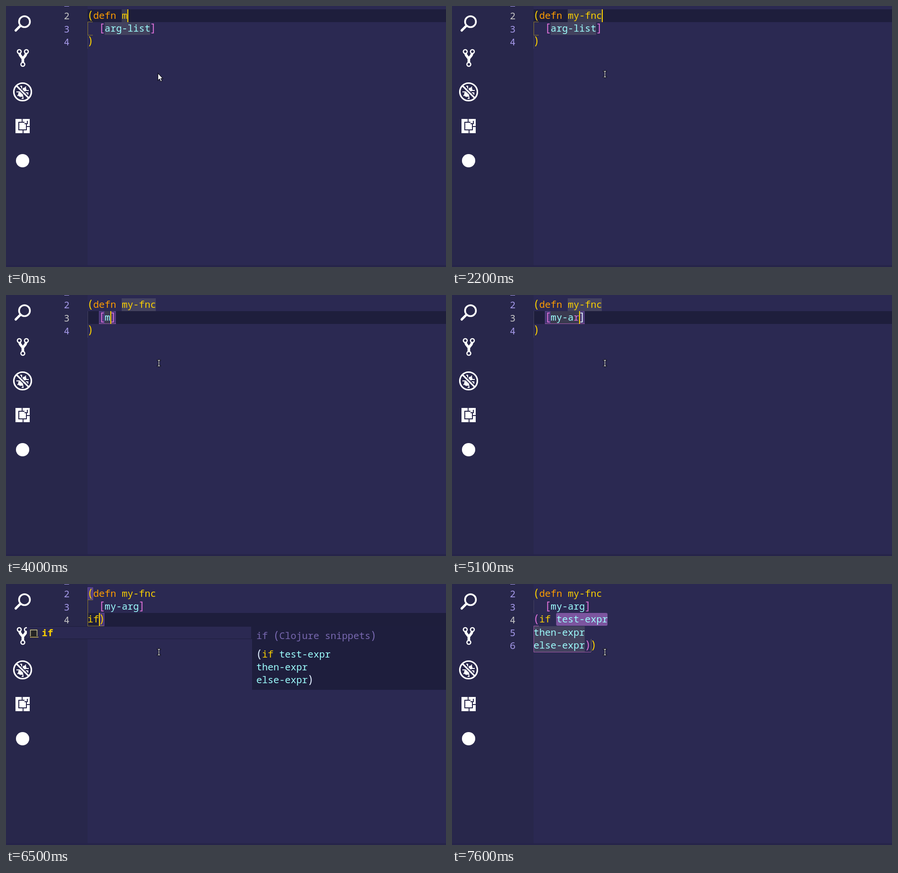
An HTML page with a canvas that plays this animation: 928 px wide and 550 px high, repeating every 8000 ms.

```html
<!DOCTYPE html>
<html lang="en">
<head>
<meta charset="utf-8">
<title>Editor snippets</title>
<style>
html, body { margin: 0; width: 100%; height: 100%; overflow: hidden; background: #2b2952; }
canvas { display: block; }
</style>
</head>
<body>
<canvas id="stage" width="928" height="550"></canvas>
<script>
const ctx = document.getElementById('stage').getContext('2d');
const LOOP = 8000;
const FAMILY = '"Noto Sans Mono", "DejaVu Sans Mono", monospace';
const FONT = '20.07px ' + FAMILY;
const BRACKET_FONT = '23px ' + FAMILY;
const LEFT = 172, ADV = 12.04, TOP = 7, PITCH = 27.2;
const C = {
  bg: '#2b2952', gutter: '#28274b', dark: '#1e1e3d', line: '#1e1e3c',
  gold: '#fad000', orange: '#ff9d00', cyan: '#9effff', pink: '#da70d6',
  white: '#e1efff', num: '#a599e9', numOn: '#c6c6c6', hint: '#7868b0',
  stop: 'rgba(124,124,124,.3)', select: '#7c559f', match: 'rgba(173,112,252,.275)',
  goldLine: '#917c2c', pinkLine: '#a45aa8', guide: '#454361'
};

const colX = col => LEFT + ADV * col;
const rowY = row => Math.round(TOP + PITCH * row);

function rect(x, y, w, h, color) {
  ctx.fillStyle = color;
  ctx.fillRect(x, y, w, h);
}

function text(str, x, y, color, font = FONT) {
  ctx.font = font;
  ctx.fillStyle = color;
  ctx.fillText(str, x, y);
}

// brackets are larger than the letters and centred in their cell
function bracket(ch, x, y, color) {
  ctx.textAlign = 'center';
  text(ch, x + ADV / 2, y, color, BRACKET_FONT);
  ctx.textAlign = 'left';
}

// parts alternate string, color
function spans(x, y, ...parts) {
  for (let i = 0; i < parts.length; i += 2) {
    for (const piece of parts[i].split(/([()[\]])/)) {
      if (/^[()[\]]$/.test(piece)) bracket(piece, x, y, parts[i + 1]);
      else text(piece, x, y, parts[i + 1]);
      x += ADV * piece.length;
    }
  }
}

const code = (row, ...parts) => spans(LEFT, rowY(row) + 20, ...parts);

function cells(row, col, count, color) {
  const x = Math.round(colX(col));
  rect(x, rowY(row), Math.round(colX(col + count)) - x, rowY(row + 1) - rowY(row), color);
}

function selection(row, col, count) {
  ctx.fillStyle = C.select;
  ctx.beginPath();
  ctx.roundRect(colX(col) - .5, rowY(row), ADV * count, 27, 3);
  ctx.fill();
}

function bracketBox(row, col) {
  const x = Math.round(colX(col));
  cells(row, col, 1, C.match);
  ctx.strokeStyle = C.match;
  ctx.lineWidth = 1;
  ctx.strokeRect(x + .5, rowY(row) + .5, 10, 26);
}

const caret = (row, col) => rect(Math.floor(colX(col)), rowY(row), 2, 27, C.gold);

function stroke(width, color, ...lines) {
  ctx.lineWidth = width;
  ctx.strokeStyle = color;
  ctx.beginPath();
  for (const pts of lines) {
    ctx.moveTo(pts[0], pts[1]);
    for (let i = 2; i < pts.length; i += 2) ctx.lineTo(pts[i], pts[i + 1]);
  }
  ctx.stroke();
}

function ring(x, y, r, width) {
  ctx.lineWidth = width;
  ctx.strokeStyle = '#fff';
  ctx.beginPath();
  ctx.arc(x, y, r, 0, 7);
  ctx.stroke();
}

function disc(x, y, r) {
  ctx.fillStyle = '#fff';
  ctx.beginPath();
  ctx.arc(x, y, r, 0, 7);
  ctx.fill();
}

function icons() {
  // search
  ring(39, 33, 11.5, 3.6);
  ctx.lineCap = 'round';
  stroke(5, '#fff', [30, 42, 20.5, 51.5]);
  ctx.lineCap = 'butt';

  // branches
  for (const [x, y] of [[28, 96], [43, 96], [35.5, 123]]) ring(x, y, 4, 2.6);
  stroke(5.5, '#fff', [28.5, 100, 30, 104, 35.5, 111, 41, 104, 42.5, 100], [35.5, 109, 35.5, 119]);

  // debugging off
  disc(31, 186, 5.5);
  disc(39, 176, 4);
  stroke(2, '#fff', [22, 181, 29, 181, 31, 186], [35, 188, 36, 195, 33, 195],
    [33, 174, 33, 169, 30, 169], [38, 176, 42, 170], [40, 178, 48, 178],
    [39, 183, 46, 183, 46, 187], [24, 189, 30, 187]);
  stroke(7, C.gutter, [21, 167, 49, 195]);
  stroke(3.2, '#fff', [21, 167, 49, 195]);
  ring(35, 181, 18.5, 3.2);

  // extensions
  rect(20, 238, 30, 30, '#fff');
  rect(26, 244, 18, 18, C.gutter);
  rect(28, 246, 14, 14, '#fff');
  rect(33, 238, 2, 7, C.gutter);
  rect(35, 261, 2, 7, C.gutter);
  rect(43, 253, 7, 2, C.gutter);
  rect(39, 242, 7, 7, C.gutter);
  rect(39, 242, 5, 5, '#fff');

  disc(35, 326, 14);
}

function pointer(arrow) {
  if (!arrow) {
    const beam = [[320, 137.5, 325, 137.5], [322.5, 137, 322.5, 150], [320, 149.5, 325, 149.5]];
    ctx.lineCap = 'square';
    stroke(3, '#10101c', ...beam);
    ctx.lineCap = 'butt';
    stroke(1, '#fff', ...beam);
    return;
  }
  const p = new Path2D('M320.5 141.5v15.5l3.5-3.3 2.3 5.5 2.7-1.2-2.3-5.2h4.3z');
  ctx.fillStyle = '#fff';
  ctx.fill(p);
  ctx.lineWidth = 1.2;
  ctx.strokeStyle = '#10101c';
  ctx.stroke(p);
}

function base(active, count, highlight) {
  rect(0, 0, 928, 550, C.bg);
  rect(0, 0, LEFT, 550, C.gutter);
  if (highlight) rect(LEFT, rowY(active), 928 - LEFT, rowY(active + 1) - rowY(active), C.line);
  rect(0, 546, 928, 4, '#26244a');
  rect(123, 0, 10, 1, C.num);
  for (let i = 0; i < count; i++) {
    text(String(i + 2), 122, Math.round(TOP + PITCH * i + 21.3), i === active ? C.numOn : C.num);
  }
  icons();
}

function head(name) {
  code(0, '(', C.gold, 'defn ', C.orange, name, C.gold);
}

function argLine(arg, close = C.pink) {
  code(1, '  [', C.pink, arg, C.cyan, ']', close);
}

function nameScene(t) {
  const keys = [[200, 'my'], [800, 'my-'], [1100, 'my-f'], [1400, 'my-fn'],
    [1700, 'my-fnc'], [2100, 'my-fn'], [2200, 'my-fnc']];
  let name = 'm';
  for (const [at, value] of keys) if (t >= at) name = value;
  base(0, 3, true);
  cells(0, 6, name.length, C.stop);
  cells(1, 3, 8, C.stop);
  rect(172, 61, 1, 29, C.guide);
  stroke(1, C.goldLine, [183, 33.5, 172.5, 33.5, 172.5, 61.5, 183, 61.5]);
  head(name);
  argLine('arg-list');
  code(2, ')', C.gold);
  caret(0, 6 + name.length);
  pointer(t < 300);
}

function argScene(t) {
  const picked = t < 3800;
  const keys = [[3800, 'm'], [4300, 'my'], [4700, 'my-'], [4800, 'my-a'], [5100, 'my-ar'], [5200, 'my-arg']];
  let arg = 'arg-list';
  for (const [at, value] of keys) if (t >= at) arg = value;
  const end = 3 + arg.length;
  base(1, 3, !picked);
  cells(0, 6, 6, C.stop);
  rect(172, 34, 1, 56, C.guide);
  if (picked) selection(1, 3, 8);
  else cells(1, 3, arg.length, C.stop);
  if (t >= 4000) {
    bracketBox(1, 2);
    bracketBox(1, end);
  }
  rect(196, 60, Math.round(colX(end + 1)) - 196, 1, C.pinkLine);
  head('my-fnc');
  // the newest letter is not yet recoloured
  if (t >= 5100 && t < 5200) code(1, '  [', C.pink, 'my-a', C.cyan, 'r', C.pink, ']', C.white);
  else argLine(arg);
  code(2, ')', C.gold);
  if (t < 3100 || t >= 3600) caret(1, end);
  pointer(false);
}

function popup() {
  rect(44, 89, 475, 27, C.dark);
  rect(44, 90, 473, 25, C.bg);
  rect(50, 95, 17, 18, '#252526');
  stroke(1.4, '#d0c8a0', [51.5, 110, 51.5, 96.7, 65.5, 96.7, 65.5, 110]);
  for (let x = 51; x < 67; x += 3) rect(x, 111, 2, 2, '#d8c060');
  text('if', 75.5, 110, C.gold, 'bold ' + FONT);
  rect(519, 89, 409, 134, C.dark);
  spans(528, 116, 'if (Clojure snippets)', C.hint);
  spans(528, 155, '(', C.white, 'if', C.gold, ' test-expr', C.cyan);
  spans(528, 182, 'then-expr', C.cyan);
  spans(528, 209, 'else-expr', C.cyan, ')', C.white);
}

function ifScene(t) {
  const typed = t < 6400 ? '' : t < 6500 ? 'i' : 'if';
  const end = typed.length;
  base(2, 3, true);
  if (t >= 5600) {
    bracketBox(0, 0);
    bracketBox(2, end);
  }
  rect(172, 34, 1, end ? 55 : 27, C.goldLine);
  rect(172, 33, 11, 1, C.goldLine);
  if (end) rect(172, 88, Math.round(ADV * (end + 1)) - 2, 1, C.goldLine);
  head('my-fnc');
  argLine('my-arg');
  code(2, typed + ')', C.gold);
  const hidden = (t >= 6200 && t < 6400) || t >= 7000;
  if (!hidden) caret(2, end);
  if (end === 2) popup();
  pointer(t >= 6700);
}

function bodyScene(t) {
  const parsed = t >= 7200, scoped = t >= 7500;
  const paren = parsed ? C.pink : C.white;
  base(2, 5, false);
  rect(172, 34, 1, 27, C.guide);
  selection(2, 4, 9);
  cells(3, 0, 9, C.stop);
  cells(4, 0, 9, C.stop);
  rect(293, 116, 1, 27, '#75715c');
  if (scoped) stroke(1, C.pinkLine, [183, 88.5, 172.5, 88.5, 172.5, 143.5, 293, 143.5]);
  head('my-fnc');
  argLine('my-arg');
  code(2, '(', paren, 'if ', C.gold, 'test-expr', C.cyan);
  code(3, 'then-expr', C.cyan);
  code(4, 'else-expr', C.cyan, ')', paren, ')', C.gold);
  if (t < 7600) caret(2, 13);
  pointer(!parsed);
}

function draw(t) {
  if (t < 2600) nameScene(t);
  else if (t < 5500) argScene(t);
  else if (t < 7100) ifScene(t);
  else bodyScene(t);
}

let start;
function tick(now) {
  start ??= now;
  draw(Math.max(0, now - start) % LOOP);
  requestAnimationFrame(tick);
}
draw(0);
requestAnimationFrame(tick);
</script>
</body>
</html>
```
